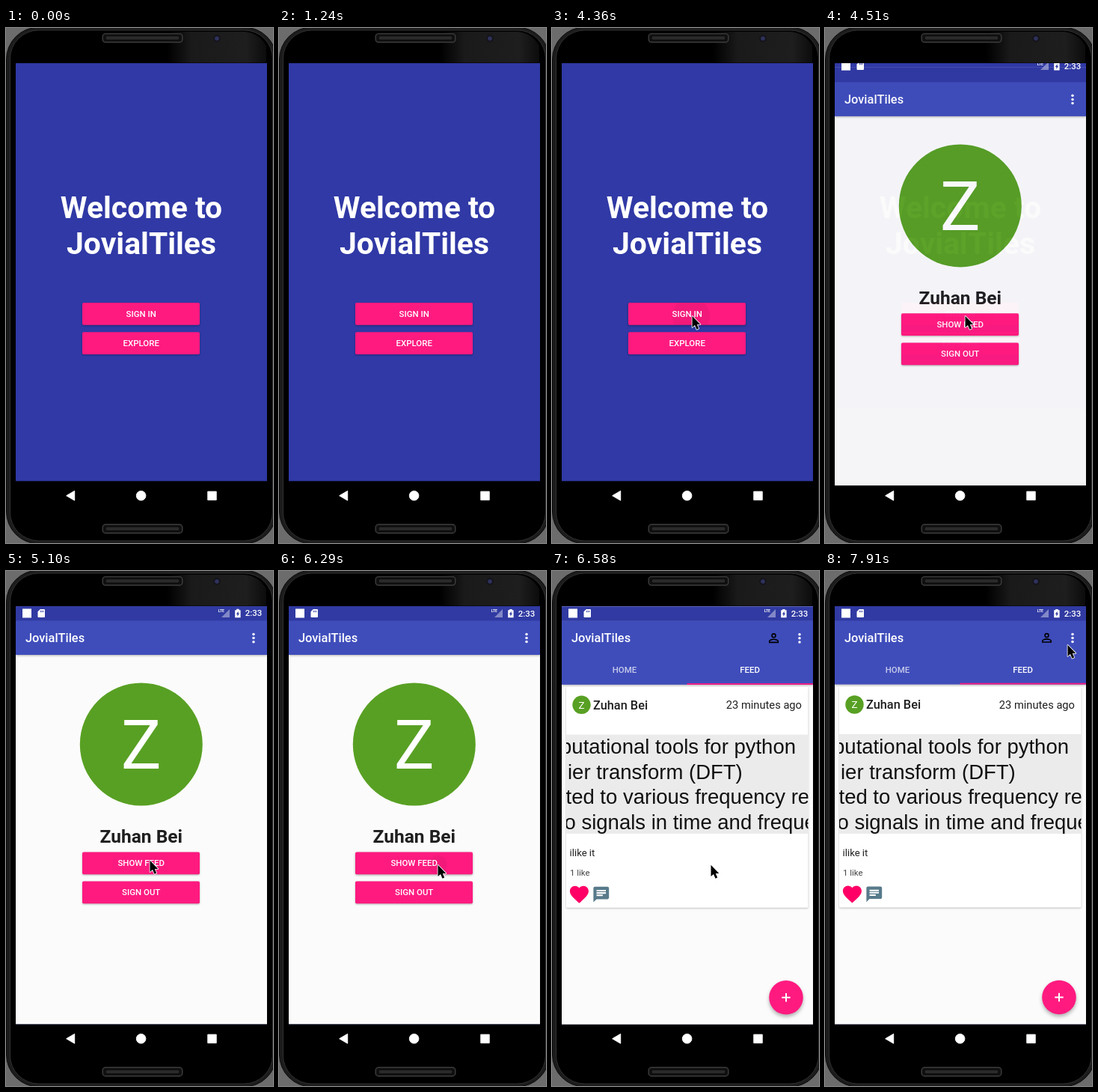
These frames come from a looping animation (357x688 px, 8000 ms). An HTML page:

```html
<!DOCTYPE html>
<html lang="en">
<head>
<meta charset="utf-8">
<title>JovialTiles</title>
<style>
html, body { margin: 0; width: 100%; height: 100%; overflow: hidden; background: #6c6c6c; }
#stage { display: block; width: 357px; height: 688px; }
text { font-family: Roboto, "Noto Sans", sans-serif; fill: #fff; }
.mid { text-anchor: middle; }
.med { font-weight: 500; }
.bold { font-weight: 700; }
.s14 { font-size: 11.44px; }
.s20 { font-size: 16.35px; }
.dark { fill: #1f1f1f; }
.photo text { font: 27.5px "Liberation Sans", Arial, sans-serif; fill: #111; }
.button { fill: #ff1a80; filter: drop-shadow(0 1px .8px rgba(0,0,0,.3)); }
.down .button { filter: drop-shadow(0 1.6px 1.6px rgba(0,0,0,.35)); }
.ripple { fill: #000; opacity: .05; }
.bar { filter: drop-shadow(0 1px 1.5px rgba(0,0,0,.3)); }
.card { filter: drop-shadow(0 1px 1px rgba(0,0,0,.25)); }
.fab { filter: drop-shadow(0 3px 2.5px rgba(0,0,0,.3)); }
</style>
</head>
<body>
<svg id="stage" viewBox="0 0 357 688"></svg>
<script>
const APP = 'JovialTiles', USER = 'Zuhan Bei';
const STAGE = document.getElementById('stage');

const label = (x, y, cls, text, extra = '') =>
  `<text x="${x}" y="${y}" class="${cls}" ${extra}>${text}</text>`;

// touch: where a press spreads from, inside the button
const button = (y, text, id = '', touch = [0, 0]) => `
  <g ${id && `id="${id}"`}>
    <rect class="button" x="102" y="${y}" width="157" height="29.8" rx="1.8"/>
    <svg x="102" y="${y}" width="157" height="29.8">
      <circle class="ripple" cx="${touch[0]}" cy="${touch[1]}" r="0"/>
    </svg>
    ${label(180.7, y + 18.9, 'mid med s14', text)}
  </g>`;

const speaker = y => `
  <rect x="129.2" y="${y}" width="106.6" height="11.4" rx="3.8" fill="#111" stroke="#3c3c3c" stroke-width="1.4"/>
  <rect x="133" y="${y + 3}" width="99" height="5.4" rx="2.5" fill="#2a2a2a" stroke="#0a0a0a"/>`;

const header = bottom => `
  <rect x="13" y="47" width="336" height="558.3" fill="#fbfbfb"/>
  <rect class="bar" x="13" y="66" width="336" height="${bottom - 66}" fill="#3f4dbb"/>
  <rect x="13" y="47" width="336" height="19.4" fill="#303aa2"/>
  ${label(26, 95.2, 'med s20', APP)}
  ${[84.4, 89.5, 94.6].map(y => `<circle cx="331" cy="${y}" r="1.75" fill="#fff"/>`).join('')}`;

const phone = `
  <defs>
    <linearGradient id="gloss">
      <stop offset="0" stop-color="#000"/><stop offset=".25" stop-color="#1a1a1a"/>
      <stop offset=".8" stop-color="#1e1e1e"/><stop offset="1" stop-color="#0c0c0c"/>
    </linearGradient>
    <clipPath id="view"><rect x="13" y="47" width="336" height="573"/></clipPath>
    <clipPath id="pic"><rect x="19" y="218" width="323.5" height="133"/></clipPath>
  </defs>
  <rect width="357" height="688" fill="#6c6c6c"/>
  <rect x=".5" y="-1" width="361" height="690" rx="43" fill="#1c1c1c" stroke="#0a0a0a"/>
  <rect x="5.5" y="3" width="351" height="682" rx="38" fill="#000" stroke="#303030"/>
  <path d="M215 5H318Q338 6 348 24V46.5H215Z" fill="url(#gloss)"/>
  ${speaker(7.6)}${speaker(663.3)}
  <circle cx="282" cy="14" r="5" fill="#15151c"/>
  <circle cx="282" cy="14" r="2.8" fill="#2f325c"/>
  <g fill="#fff" stroke="#fff" stroke-linejoin="round">
    <path d="M80.7 624.8L91.7 618.4V631.2Z"/>
    <circle cx="180.6" cy="624.8" r="6.3"/>
    <rect x="269.8" y="619.2" width="11.4" height="11.4"/>
  </g>`;

const welcome = `
  <rect x="13" y="47" width="336" height="558.3" fill="#3039a5"/>
  ${label(181, 254.2, 'mid bold', 'Welcome to', 'font-size="40.87"')}
  ${label(181, 302.2, 'mid bold', APP, 'font-size="40.87"')}
  ${button(367, 'SIGN IN', 'signIn', [84, 18])}${button(406.2, 'EXPLORE')}`;

const profile = `
  ${header(112)}
  <circle cx="180.8" cy="231.5" r="82" fill="#58a023"/>
  ${label(180.6, 264, 'mid', 'Z', 'font-size="90"')}
  ${label(180.8, 363.3, 'mid bold dark', USER, 'font-size="24.5"')}
  ${button(375.4, 'SHOW FEED', 'showFeed', [110, 17])}${button(414.5, 'SIGN OUT')}`;

const feed = `
  ${header(151.5)}
  <g transform="translate(286.7 79.5) scale(.8175)" fill="none" stroke="#000" stroke-width="1.95">
    <circle cx="12" cy="8" r="3"/>
    <path d="M4.95 19.05V17c0-1.7 4.2-3.05 7.05-3.05s7.05 1.35 7.05 3.05v2.05z"/>
  </g>
  ${label(97, 135.9, 'mid med s14', 'HOME', 'opacity=".7"')}
  ${label(264.6, 135.9, 'mid med s14', 'FEED')}
  <rect x="180.5" y="149.7" width="168.5" height="1.8" fill="#ff1a80"/>
  <g id="card">
    <rect class="card" x="19" y="154.5" width="323.5" height="295" rx="1.6" fill="#fff"/>
    <circle cx="39.5" cy="178.5" r="12.2" fill="#58a023"/>
    ${label(39.5, 183.3, 'mid', 'Z', 'font-size="13.5"')}
    ${label(55, 184.4, 'med s20 dark', USER)}
    ${label(334, 184, 'dark', '23 minutes ago', 'font-size="14.7" text-anchor="end"')}
    <g class="photo" clip-path="url(#pic)">
      <rect x="19" y="218" width="323.5" height="133" fill="#ebebeb"/>
      ${label(326, 244, '', 'putational tools for python', 'text-anchor="end"')}
      ${label(21, 277.6, '', 'ier transform (DFT)')}
      ${label(18.5, 311.2, '', 'ted to various frequency representations')}
      ${label(16.5, 344.8, '', 'o signals in time and frequency')}
    </g>
    ${label(23.6, 381, 'dark', 'ilike it', 'font-size="13.1"')}
    ${label(24, 406.8, 's14', '1 like', 'style="fill:#444"')}
    <path transform="translate(21.4 416.8) scale(1.25)" fill="#ff0066"
      d="M12 21.35l-1.45-1.32C5.4 15.36 2 12.28 2 8.5 2 5.42 4.42 3 7.5 3c1.74 0 3.41.81 4.5 2.09C13.09 3.81 14.76 3 16.5 3 19.58 3 22 5.42 22 8.5c0 3.78-3.4 6.86-8.55 11.54z"/>
    <path transform="translate(53.3 419.4) scale(1.04)" fill="#587a8b"
      d="M20 2H4c-1.1 0-2 .9-2 2V22l4-4h14c1.1 0 2-.9 2-2V4c0-1.1-.9-2-2-2zM6 9h12v2H6V9zm8 5H6v-2h8v2zm4-6H6V6h12v2z"/>
  </g>
  <circle class="fab" cx="313" cy="569.5" r="22.8" fill="#ff1a80"/>
  <path d="M307.3 569.5h11.4M313 563.8v11.4" stroke="#fff" stroke-width="2"/>`;

const status = `
  <rect x="22" y="50.5" width="12" height="12" fill="#fff"/>
  <path d="M45.8 51H51q1 0 1 1v9q0 1-1 1H43.5q-1 0-1-1V54.3z" fill="#fff"/>
  <path d="M46.3 52.8v2.4M48.1 52.8v2.4M49.9 52.8v2.4" stroke="#303aa2" stroke-width=".9"/>
  ${label(283.8, 55.4, 'bold', 'LTE', 'font-size="5"')}
  <path d="M299 51V62H288Z" fill="#fff" opacity=".4"/>
  <path d="M306.2 52.2h2v-1.3h3.4v1.3h2V62.3h-7.4z" fill="#fff"/>
  <path d="M310.6 53.8l-2.8 4h1.6v3l2.7-4.2h-1.5z" fill="#303aa2"/>
  ${label(319.8, 60.5, 'med s14', '2:33')}`;

STAGE.innerHTML = `${phone}
  <g clip-path="url(#view)">
    <g id="welcome">${welcome}</g>
    <g id="profile">${profile}</g>
    <g id="feed">${feed}</g>
    <g id="status">${status}</g>
  </g>
  <g id="cursor">
    <path d="M.5 .8V16L4 12.9 6.5 18.7 9.2 17.5 6.8 11.9H11.3Z" fill="#000"
      stroke="#fff" stroke-width="1.6" stroke-linejoin="round" paint-order="stroke"/>
  </g>`;

const el = id => document.getElementById(id);
const [profileWin, feedWin, statusBar, card, cursor, signIn, showFeed] =
  ['profile', 'feed', 'status', 'card', 'cursor', 'signIn', 'showFeed'].map(el);

const LOOP = 8000;
// time, then the pointer tip; no tip means hidden
const PATH = [
  [0],
  [500, 273, 502], [650, 285, 513], [800, 303, 533], [950, 322, 555], [1100, 345, 577], [1240],
  [2740, 303, 460], [2890, 288, 448], [3040, 262, 428], [3180, 232, 405],
  [3330, 208, 388], [3480, 193, 377], [3620, 189, 375], [3770, 188, 381], [3920, 187, 384],
  [5100, 192, 386], [5250, 215, 392], [5400, 241, 399], [5550, 225, 396], [5700, 212, 392],
  [6730, 214, 390], [6880, 240, 352], [7020, 249, 159],
  [7320, 256, 154], [7470, 278, 136], [7610, 301, 117], [7760, 317, 104], [7910, 324, 98]
];
// moments at which presses and windows are redrawn
const TICKS = [0, 4210, 4360, 4510, 4660, 6290, 6440, 6580, 6730];

const show = (node, on) => node.setAttribute('visibility', on ? 'inherit' : 'hidden');
const last = (list, test) => list.filter(test).pop();

// A new window fades in while it slides up; returns its offset.
function open(win, age) {
  const left = span => Math.max(0, 1 - age / span);
  const dy = 45 * left(350) ** 5;
  show(win, age >= 0);
  win.setAttribute('opacity', 1 - left(200) ** 4);
  win.setAttribute('transform', `translate(0 ${dy.toFixed(2)})`);
  return dy;
}

function press(btn, age) {
  btn.classList.toggle('down', age > 0);
  btn.querySelector('.ripple').setAttribute('r', Math.max(0, age / 12));
}

function draw(t) {
  const tick = last(TICKS, s => s <= t);
  const dy = open(profileWin, tick - 4393);
  open(feedWin, tick - 6359);
  show(statusBar, tick >= 4510);
  statusBar.setAttribute('transform', `translate(0 ${(-dy).toFixed(2)})`);
  show(card, tick >= 6580);
  press(signIn, tick - 4060);
  press(showFeed, tick - 6140);
  const [, x, y] = last(PATH, p => p[0] <= t);
  show(cursor, x !== undefined);
  if (x !== undefined) cursor.setAttribute('transform', `translate(${x} ${y})`);
}

const start = performance.now();
function loop() {
  draw((performance.now() - start) % LOOP);
  requestAnimationFrame(loop);
}
loop();
</script>
</body>
</html>
```
